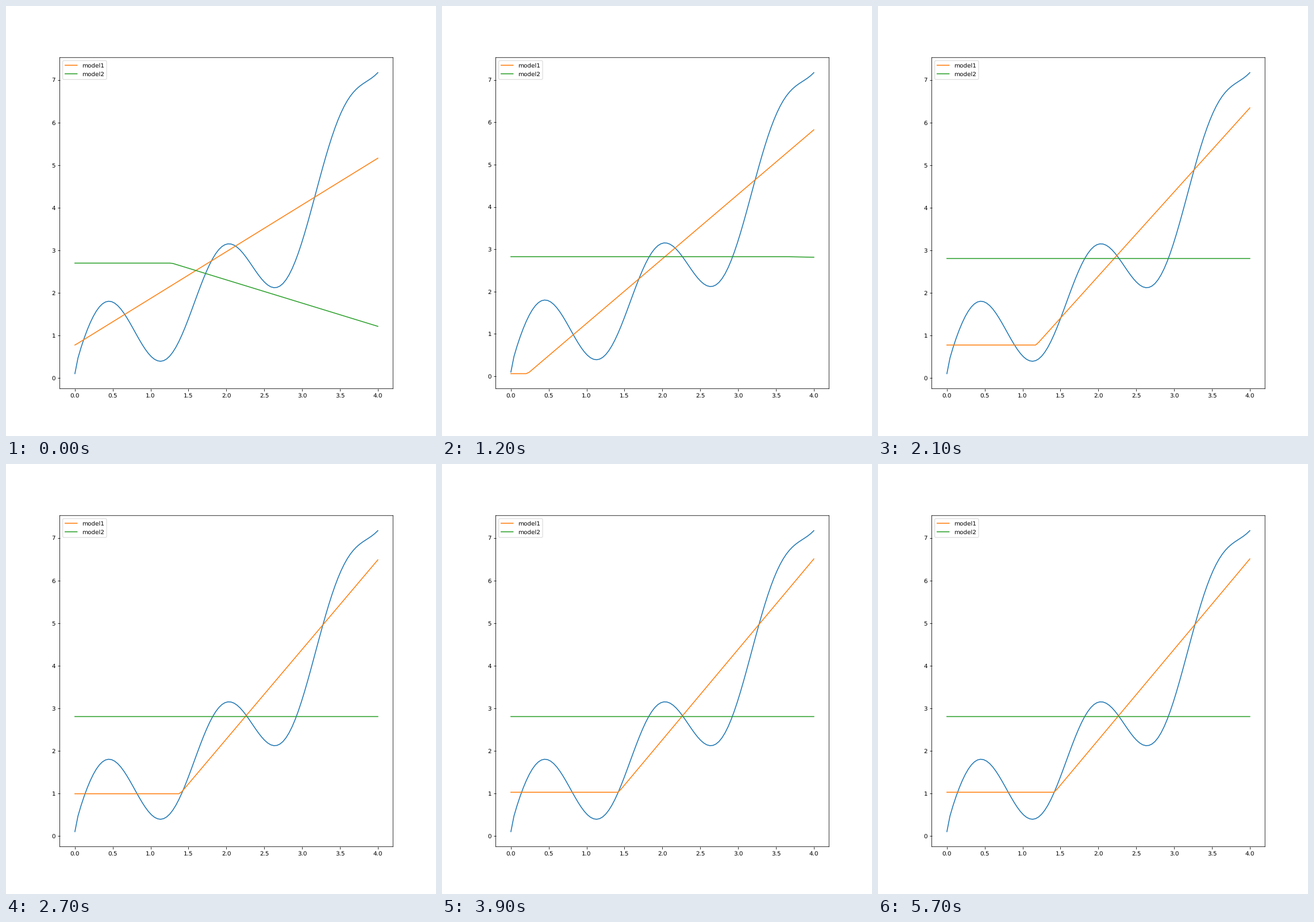
Recreate the animation shown at these times as a matplotlib script. Size 748 by 748 pixels, loop 6 s.

```python
import numpy as np
import matplotlib.pyplot as plt
from matplotlib.animation import FuncAnimation

FRAMES, STEP_MS = 20, 300
MARGIN = 0.05

plt.rcParams.update({"path.snap": False, "text.hinting": "none"})

x = np.linspace(0, 4, 100)
y = np.sin(4 * x) + np.sqrt(x) + np.exp(x) / 10


def relu(v):
    return np.maximum(v, 0)


def best_line(kink):
    """Least-squares slope and level for a fixed kink."""
    return np.polyfit(relu(x - kink), y, 1)


def model1(i):
    """The kink slides along a logistic; the line trails its best fit."""
    final, rate, middle = 1.421, 1.094, 5.55
    share = 1 / (1 + np.exp(-rate * (i - middle)))
    kink = final * share
    speed = rate * kink * (1 - share)
    start = np.array([1.0975, 0.77])
    lag = np.array([0.18, -0.45]) * speed
    settle = (start - best_line(0)) * np.exp(-0.86 * i)
    slope, level = best_line(kink) + lag + settle
    return level + slope * relu(x - kink)


def model2(i):
    """The kink leaves on the right while the level overshoots the mean."""
    kink = 1.28 + 0.465 * i ** 1.175
    slope = -0.546 * np.exp(-0.68 * i)
    level = y.mean() + (0.66 * i - 0.107) * np.exp(-1.2 * i)
    return level + slope * relu(x - kink)


fig, ax = plt.subplots(figsize=(10, 10), dpi=74.8)
ax.plot(x, y)
line1, = ax.plot(x, model1(0), label="model1")
line2, = ax.plot(x, model2(0), label="model2")
ax.legend(loc="upper left")


def update(i):
    fits = model1(i), model2(i)
    line1.set_ydata(fits[0])
    line2.set_ydata(fits[1])
    low, high = np.min([y, *fits]), np.max([y, *fits])
    pad = MARGIN * (high - low)
    ax.set_ylim(low - pad, high + pad)
    return line1, line2


anim = FuncAnimation(fig, update, frames=FRAMES, interval=STEP_MS,
                     repeat=True, repeat_delay=0, blit=False)
plt.show()
```
